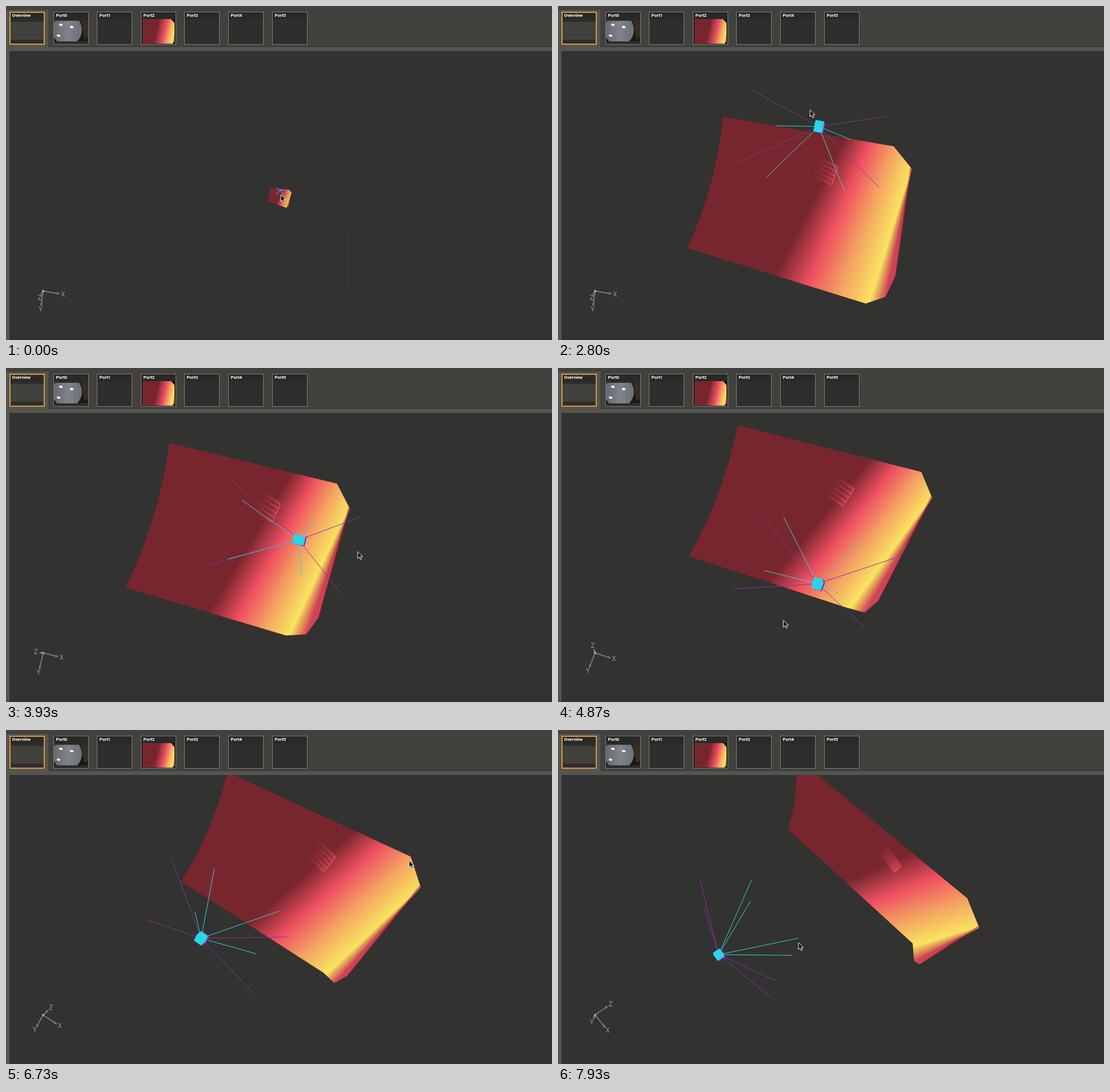
An HTML page with a canvas for the animation above (8000 ms loop, 956 px wide and 586 px high).

```html
<!DOCTYPE html>
<html lang="en">
<head>
<meta charset="utf-8">
<title>Depth view</title>
<style>
  html, body { margin: 0; width: 100%; height: 100%; overflow: hidden; background: #323230; }
  canvas { position: absolute; left: 0; top: 0; }
  .label { position: absolute; top: 12px; font: bold 8px/10px Roboto, sans-serif; letter-spacing: -.1px; color: #fff; }
</style>
</head>
<body>
<canvas id="stage" width="956" height="586"></canvas>
<script>
const LOOP = 8000, FOCAL = 950, CENTER = [484, 333];
const ctx = document.getElementById('stage').getContext('2d');
const chrome = document.createElement('canvas');
chrome.width = 956;
chrome.height = 586;

// Scene in 3D around the orbit pivot: x right, y down, z into the screen
const sensor = [-58, -20, -200];
const sheet = {
  topLeft: [-226, -150, 69], topRight: [124, -180, 117], shoulder: [168, -140, 124],
  lowRight: [150, 93, 114], lip: [137, 135, 128], fold: [106, 148, 157],
  bottomLeft: [-238, 112, 88], leftBend: [-212, -19, 78]
};
const bump = { from: [12, -106, 109], to: [6, -69, 114], streak: [-43, -12, -3] };
const fans = [
  { color: '#8a2fa8', reach: [103, 60, 38] },
  { color: '#35d3dc', reach: [62, 46, 108] }
];

// [time, log10 of zoom], [time, yaw, pitch, roll], [time, x, y]
const zoomKeys = [[270, -1], [1000, -.757], [1200, -.542], [1930, 0]];
const turnKeys = [[2800, -6.6, -21.7, 7.4], [3930, -20.7, -2.5, 13], [4870, -14, 17, 22], [6730, 9.2, 31, 29], [7930, 28, 67, 25]];
const pointerKeys = [[270, 481, 331], [1000, 466, 332], [2000, 466, 332], [2800, 441, 182], [3930, 616, 322],
  [4870, 394, 443], [6730, 706, 229], [7930, 421, 373]];

const ramp = [[120, 38, 46], [238, 80, 96], [244, 163, 98], [249, 230, 96], [208, 68, 86]];

const mix = (a, b, p) => a.map((v, i) => v + (b[i] - v) * p);
const add = (a, b) => a.map((v, i) => v + b[i]);
const rgb = c => `rgb(${c.map(Math.round)})`;
const rampColor = u => {
  const i = Math.min(Math.floor(u), ramp.length - 2);
  return rgb(mix(ramp[i], ramp[i + 1], Math.min(u - i, 1)));
};

function at(keys, t) {
  const i = keys.findIndex(k => k[0] >= t);
  if (i < 1) return keys.at(i).slice(1);
  const a = keys[i - 1], b = keys[i];
  return mix(a, b, (t - a[0]) / (b[0] - a[0])).slice(1);
}

// the third drag slows down and rests before the next one
function paced(t) {
  if (t < 4870 || t > 6730) return t;
  const left = 1 - Math.min(1, (t - 4870) / 1660);
  return 4870 + 1860 * (1 - left ** 3);
}

function makeCamera(t) {
  const angles = at(turnKeys, t).map(a => a * Math.PI / 180);
  const [sy, sp, sr] = angles.map(Math.sin), [cy, cp, cr] = angles.map(Math.cos);
  const distance = FOCAL / 10 ** at(zoomKeys, t)[0];
  const rotate = ([x, y, z]) => {
    const x1 = cy * x + sy * z, z1 = cy * z - sy * x;
    const y2 = cp * y - sp * z1, z2 = sp * y + cp * z1;
    return [cr * x1 - sr * y2, sr * x1 + cr * y2, z2];
  };
  const project = p => {
    const [x, y, z] = rotate(p), s = FOCAL / (distance + z);
    return [CENTER[0] + x * s, CENTER[1] + y * s];
  };
  return { rotate, project, scale: FOCAL / distance };
}

function line(c, a, b, color) {
  c.strokeStyle = color;
  c.beginPath();
  c.moveTo(...a);
  c.lineTo(...b);
  c.stroke();
}

function polygon(c, points, color) {
  c.fillStyle = color;
  c.beginPath();
  points.forEach(p => c.lineTo(...p));
  c.closePath();
  c.fill();
}

function sheetOutline(project) {
  const path = new Path2D();
  const { topLeft, topRight, shoulder, lowRight, lip, fold, bottomLeft, leftBend } = sheet;
  for (const p of [topLeft, topRight, shoulder, lowRight, lip, fold, bottomLeft]) path.lineTo(...project(p));
  path.quadraticCurveTo(...project(leftBend), ...project(topLeft));
  path.closePath();
  return path;
}

// A line of equal colour, as its top and bottom ends in 3D
function isoLine(u) {
  const flat = Math.min(u, 3);
  const top = mix(sheet.topLeft, sheet.topRight, .69 + .155 * flat);
  const bottom = mix(sheet.bottomLeft, sheet.fold, .463 + .185 * flat);
  const curl = Math.max(0, u - 3);
  return [mix(top, sheet.shoulder, curl), mix(bottom, sheet.lip, curl)];
}

function drawSheet(project) {
  const strips = 80, end = 4.4;
  const edge = u => {
    const [a, b] = isoLine(u).map(project);
    return [mix(a, b, -.2), mix(a, b, 1.2)];
  };
  const outline = sheetOutline(project);
  ctx.save();
  ctx.fillStyle = rgb(ramp[0]);
  ctx.fill(outline);
  ctx.clip(outline);
  for (let n = 0; n < strips; n++) {
    const u = n / strips * end, next = (n + 1.4) / strips * end;
    const [a, b] = edge(u), [c, d] = edge(next);
    polygon(ctx, [a, b, d, c], rampColor(u));
  }
  ctx.restore();
}

function drawBump({ project, scale }) {
  ctx.lineWidth = 5 * scale;
  for (let i = 0; i < 5; i++) {
    const root = mix(bump.from, bump.to, i / 4);
    const a = project(root), b = project(add(root, bump.streak));
    const fade = ctx.createLinearGradient(...a, ...b);
    fade.addColorStop(0, 'rgba(222,76,88,.6)');
    fade.addColorStop(1, 'rgba(190,60,74,0)');
    line(ctx, a, b, fade);
  }
  ctx.lineWidth = 1.5 * scale;
  line(ctx, project(bump.from), project(bump.to), 'rgba(240,104,96,.6)');
}

function drawSensor({ project, scale }) {
  const signs = [-1, 1], origin = project(sensor);
  ctx.lineWidth = 1;
  for (const { color, reach: [x, y, z] } of fans)
    for (const i of signs) for (const j of signs)
      line(ctx, origin, project(add(sensor, [i * x, j * y, z])), color);

  const cube = (color, shift) => {
    for (let axis = 0; axis < 3; axis++) for (const side of signs) {
      const face = [[-6, -6], [6, -6], [6, 6], [-6, 6]].map(([a, b]) => {
        const corner = [a, b];
        corner.splice(axis, 0, 6 * side);
        const [x, y] = project(add(sensor, corner));
        return [x + shift, y + shift / 2];
      });
      polygon(ctx, face, color);
    }
  };
  cube('#8d28c0', 2 * scale);
  cube('#27d5e8', 0);
}

function drawAxes(rotate) {
  const origin = [65, 500], arm = 35.5;
  ctx.font = '12px "Open Sans", sans-serif';
  ctx.textAlign = 'center';
  ctx.textBaseline = 'middle';
  [...'XYZ'].forEach((name, i) => {
    const unit = [0, 0, 0];
    unit[i] = arm;
    const [x, y] = rotate(unit), reach = Math.max(Math.hypot(x, y) - 5, 4);
    ctx.save();
    ctx.translate(...origin);
    ctx.fillStyle = '#a2a29f';
    ctx.fillText(name, x, y + .5);
    ctx.rotate(Math.atan2(y, x));
    ctx.lineWidth = 2;
    line(ctx, [0, 0], [reach - 4, 0], '#777775');
    polygon(ctx, [[reach, 0], [reach - 6, -2.5], [reach - 6, 2.5]], '#777775');
    ctx.restore();
  });
  ctx.fillStyle = '#aaaaa8';
  ctx.beginPath();
  ctx.arc(...origin, 2, 0, 7);
  ctx.fill();
}

function drawPointer([x, y]) {
  const arrow = new Path2D('M0 0V12L2.8 9.4L4.9 14L7 13L5 8.6H8.8Z');
  ctx.save();
  ctx.translate(x, y);
  ctx.fillStyle = '#111';
  ctx.fill(arrow);
  ctx.lineWidth = 1;
  ctx.strokeStyle = '#eee';
  ctx.stroke(arrow);
  ctx.restore();
}

function drawRoom(t) {
  const fade = .25 * Math.max(0, Math.min(1, (2000 - t) / 700));
  const tint = `rgba(20,20,18,${fade})`;
  ctx.lineWidth = 1;
  line(ctx, [130.5, 395], [130.5, 495], tint);
  line(ctx, [603.5, 395], [603.5, 497], tint);
  line(ctx, [562, 356], [603, 395], tint);
  line(ctx, [350, 185], [455, 252], tint);
}

function drawPhoto(c) {
  c.save();
  c.beginPath();
  c.rect(84, 26, 59, 36);
  c.clip();
  c.fillStyle = '#1b1a18';
  c.fillRect(84, 26, 59, 36);
  const wall = c.createLinearGradient(84, 0, 134, 0);
  wall.addColorStop(0, '#666a70');
  wall.addColorStop(.5, '#80838a');
  wall.addColorStop(1, '#6b6e75');
  c.fillStyle = wall;
  c.beginPath();
  c.ellipse(107, 42, 26, 27, 0, 0, 7);
  c.fill();
  polygon(c, [[132, 26], [143, 26], [143, 54], [137, 58]], '#3a2d20');
  c.fillStyle = '#f4f6fa';
  for (const [x, y] of [[96, 33], [115, 37], [92, 52]]) {
    c.beginPath();
    c.ellipse(x, y, 3.2, 2, .2, 0, 7);
    c.fill();
  }
  c.restore();
}

function drawDepthThumb(c) {
  const g = c.createLinearGradient(264, 42, 299, 50);
  ramp.forEach((color, i) => g.addColorStop([0, .4, .62, .84, 1][i], rgb(color)));
  c.fillStyle = '#171513';
  c.fillRect(238, 23, 58, 43);
  polygon(c, [[239, 23], [289, 23], [295, 30], [295, 62], [292, 66], [239, 66]], g);
  c.fillStyle = 'rgba(210,70,82,.4)';
  c.fillRect(270, 32, 6, 5);
}

function drawChrome(c) {
  const rect = (color, ...r) => { c.fillStyle = color; c.fillRect(...r); };
  rect('#41413e', 0, 0, 956, 72);
  rect('#383835', 74, 71, 882, 1);
  rect('#545450', 0, 72, 956, 7);
  rect('#545450', 0, 7, 74, 72);
  rect('#545450', 0, 79, 6, 507);
  ['Overview', 'Port0', 'Port1', 'Port2', 'Port3', 'Port4', 'Port5'].forEach((name, i) => {
    const x = Math.round(6 + 76.6 * i);
    rect('#2e2e2c', x, 10, 62, 58);
    rect('#292927', x, 11, 62, 13);
    if (i === 0) rect('#41413e', x, 28, 62, 31);
    if (i === 1) drawPhoto(c);
    if (i === 3) drawDepthThumb(c);
    c.lineWidth = i ? 1 : 2;
    c.strokeStyle = i ? '#7c7c79' : '#dc9a35';
    const inset = c.lineWidth / 2;
    c.strokeRect(x + inset, 10 + inset, 62 - 2 * inset, 58 - 2 * inset);
    const label = document.createElement('span');
    label.className = 'label';
    label.style.left = x + 4.5 + 'px';
    label.textContent = name;
    document.body.append(label);
  });
}

function draw(now) {
  const t = paced(now), camera = makeCamera(t);
  ctx.fillStyle = '#323230';
  ctx.fillRect(0, 0, 956, 586);
  drawRoom(t);
  drawSheet(camera.project);
  drawBump(camera);
  drawSensor(camera);
  drawAxes(camera.rotate);
  drawPointer(at(pointerKeys, t));
  ctx.drawImage(chrome, 0, 0);
}

drawChrome(chrome.getContext('2d'));
const start = performance.now();
function tick() {
  draw((performance.now() - start) % LOOP);
  requestAnimationFrame(tick);
}
tick();
</script>
</body>
</html>
```
